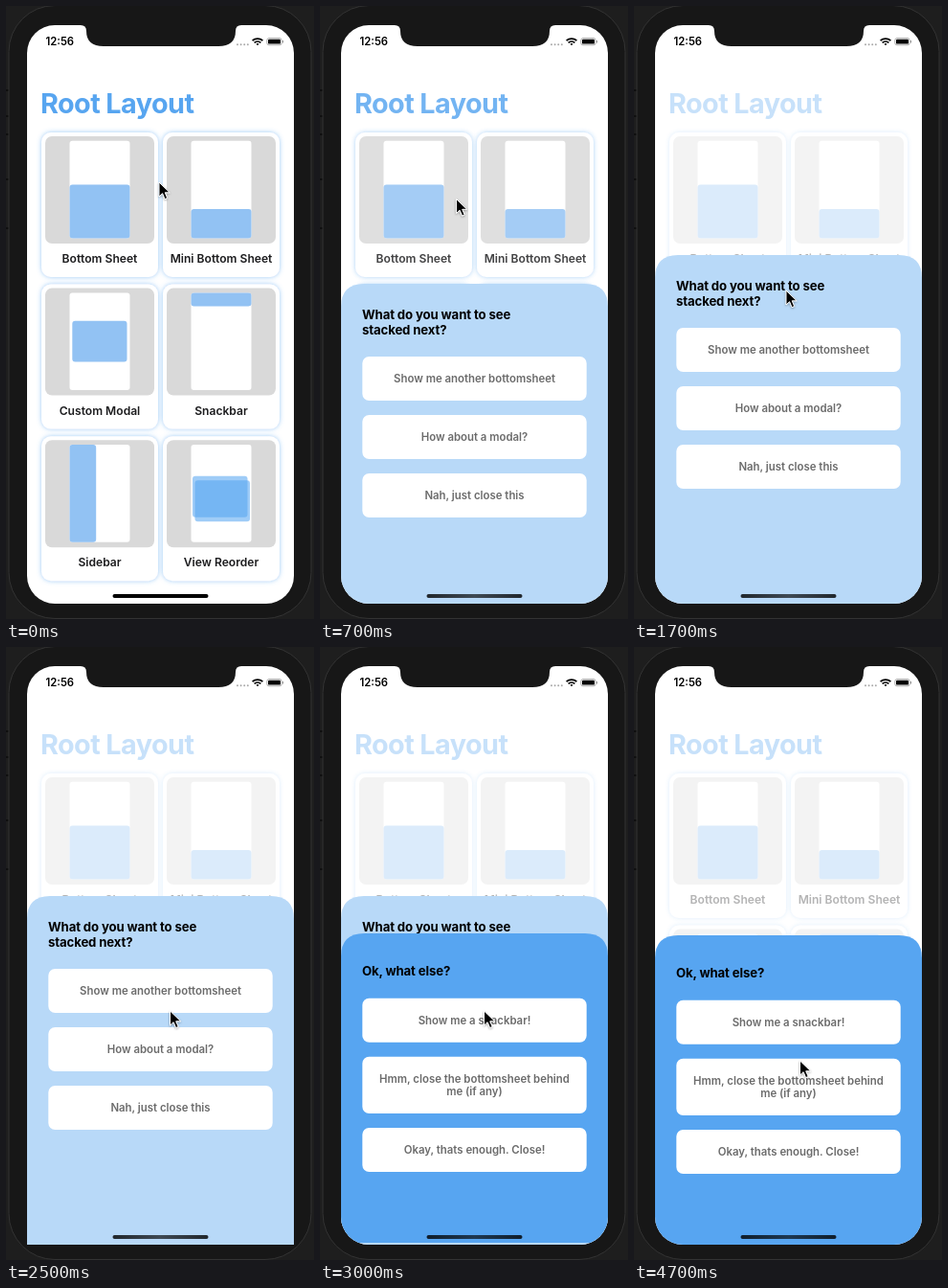
Write an HTML page that moves like this. It is 322x640 px and loops after 5000 ms.

```html
<!DOCTYPE html>
<html lang="en">
<head>
<meta charset="utf-8">
<title>Root layout demo</title>
<style>
  html, body { margin: 0; width: 100%; height: 100%; overflow: hidden; background: #1e1e1e; }
  svg { display: block; width: 322px; height: 640px; }
  text { font-family: Inter, "Open Sans", sans-serif; font-weight: 600; font-optical-sizing: none; }
  .clock { font-size: 11.3px; }
  .heading { font-size: 28.8px; font-weight: 700; letter-spacing: -.02em; fill: #57a5f0; }
  .label { font-size: 12.1px; text-anchor: middle; fill: #1c1c1e; }
  .question { font-size: 13.2px; font-weight: 700; letter-spacing: -.01em; }
  .action { font-size: 11.4px; text-anchor: middle; fill: #6b6b6b; }
</style>
</head>
<body>
<svg viewBox="0 0 322 640">
  <defs>
    <clipPath id="screen"><rect x="22" y="20" width="279" height="604" rx="29"/></clipPath>
    <filter id="glow" x="-15%" y="-15%" width="130%" height="130%">
      <feDropShadow dx="0" dy="0" stdDeviation="2.4" flood-color="#57a5f1" flood-opacity=".6"/>
    </filter>
    <filter id="shade" x="-50%" y="-50%" width="200%" height="200%">
      <feDropShadow dx="0" dy="1" stdDeviation="1" flood-opacity=".35"/>
    </filter>
    <linearGradient id="bar">
      <stop stop-opacity=".82"/><stop offset=".5" stop-opacity=".66"/><stop offset="1" stop-opacity=".82"/>
    </linearGradient>
  </defs>

  <path d="M0 88h3M0 115h3M0 134h3M0 181h3M0 232h3" stroke="#0b0b0b" stroke-width="1.5"/>
  <rect x="3" y="-.5" width="316" height="640" rx="48" fill="#171717" stroke="#333"/>

  <g clip-path="url(#screen)">
    <rect x="22" y="20" width="279" height="604" fill="#fff"/>
    <g id="content">
      <text class="heading" x="36" y="112">Root Layout</text>
      <g id="cards"></g>
    </g>
    <g id="lightSheet"></g>
    <g id="strongSheet"></g>
    <rect id="home" x="111.5" y="614" width="100" height="4" rx="2"/>
  </g>

  <path d="M78 19H246V20q-6 0-6 6q0 16-18 16H102q-18 0-18-16q0-6-6-6z" fill="#171717"/>
  <text class="clock" x="41.5" y="41">12:56</text>
  <path d="M242 40.3h11" stroke="#aaa" stroke-width="2" stroke-linecap="round" stroke-dasharray="0 3.6"/>
  <g fill="none" stroke="#000" stroke-width="1.7">
    <path d="M257.6 36.2a7.8 7.8 0 0 1 10.8 0M259.6 38.4a5 5 0 0 1 6.8 0"/>
    <path d="M261.5 39.6q1.5-1 3 0l-1.5 1.6z" fill="#000" stroke="none"/>
    <rect x="272.8" y="33.6" width="15.4" height="7.2" rx="2.2" stroke="#999" stroke-width=".8"/>
    <rect x="274" y="34.8" width="13" height="4.8" rx="1.2" fill="#000" stroke="none"/>
    <path d="M289.6 36v2.5" stroke="#999" stroke-width="1"/>
  </g>

  <path id="cursor" d="M0 0V15L3.6 11.7L6.1 17.6L8.7 16.5L6.2 10.8H11.2Z" stroke="#fff" stroke-width="1" filter="url(#shade)"/>
</svg>

<script>
const byId = id => document.getElementById(id);
const rect = (x, y, w, h, rx, fill, extra = '') =>
  `<rect x="${x}" y="${y}" width="${w}" height="${h}" rx="${rx}" fill="${fill}" ${extra}/>`;
const text = (kind, x, y, words) => `<text class="${kind}" x="${x}" y="${y}">${words}</text>`;

const ICON_BLUE = '#92c2f3';
const block = (x, y, w, h) => rect(x, y, w, h, 3, ICON_BLUE);
const layer = (x, y) => rect(x, y, 57.5, 43, 3, '#57a5f1', 'fill-opacity=".57"');

const cards = [
  ['Bottom Sheet', block(29.5, 54.5, 63, 56)],
  ['Mini Bottom Sheet', block(29.5, 80, 63, 30.5)],
  ['Custom Modal', block(32.3, 38.2, 57.2, 42.8)],
  ['Snackbar', block(29.5, 8.8, 63, 14)],
  ['Sidebar', block(29.5, 8.8, 27.7, 101.7)],
  ['View Reorder', layer(31, 41.5) + layer(33.5, 46)],
];
byId('cards').innerHTML = cards.map(([name, icon], i) =>
  `<g transform="translate(${37 + i % 2 * 127} ${132 + Math.floor(i / 2) * 158.6})">
    ${rect(0, 0, 122, 151, 10, '#fff', 'filter="url(#glow)"')}
    ${rect(4, 4, 114, 112, 7, '#d9d9d9')}
    ${rect(29.5, 8.8, 63, 101.7, 3, '#fff')}
    ${icon}${text('label', 61, 136.3, name)}
  </g>`).join('');

// Sheets are drawn with their top edge at y = 0.
const button = (y, ...lines) => {
  const height = 32.7 + 13.3 * lines.length;
  const first = y + height / 2 + 4.1 - (lines.length - 1) * 6.65;
  return rect(44.3, y, 234.4, height, 7, '#fff') +
    lines.map((line, i) => text('action', 161.5, first + i * 13.3, line)).join('');
};
const sheet = (height, fill, body) =>
  `<path d="M22 ${height}V24q0-24 24-24H277q24 0 24 24V${height}z" fill="${fill}"/>${body}`;

byId('lightSheet').innerHTML = sheet(364, '#b8d9f8',
  text('question', 44, 37, 'What do you want to see') +
  text('question', 44, 53, 'stacked next?') +
  button(76, 'Show me another bottomsheet') +
  button(137, 'How about a modal?') +
  button(198, 'Nah, just close this'));
byId('strongSheet').innerHTML = sheet(323, '#57a5f1',
  text('question', 44, 44, 'Ok, what else?') +
  button(67.8, 'Show me a snackbar!') +
  button(128.8, 'Hmm, close the bottomsheet behind', 'me (if any)') +
  button(203, 'Okay, thats enough. Close!'));

// Each track lists [time, ...values]; values are interpolated between entries.
const cursorTrack = [[0, 160, 184], [100, 159, 185], [500, 143, 201], [600, 142.5, 201.5],
  [1200, 142.5, 201.5], [1700, 159, 297], [2200, 159, 297], [2300, 166, 350],
  [2400, 171, 400], [2500, 171.5, 380], [4000, 171.5, 380], [4300, 173.5, 432]];
const fadeTrack = [[600, 1], [1000, .33]];
const lightTrack = [[600, 624], [700, 290], [800, 250], [900, 257], [1000, 260],
  [4400, 260], [4500, 278], [4600, 624]];
const strongTrack = [[2600, 624], [2700, 540], [2800, 319], [2900, 290], [3000, 299],
  [3100, 301.5], [3200, 301]];

function sample(track, t) {
  const next = track.findIndex(key => key[0] > t);
  if (next < 0) return track.at(-1).slice(1);
  if (next === 0) return track[0].slice(1);
  const a = track[next - 1], b = track[next];
  const k = (t - a[0]) / (b[0] - a[0]);
  return a.slice(1).map((v, i) => v + (b[i + 1] - v) * k);
}
const move = (id, x, y) => byId(id).setAttribute('transform', `translate(${x} ${y})`);

function draw(now) {
  const t = Math.floor(now % 5000 / 100) * 100;
  byId('content').setAttribute('opacity', sample(fadeTrack, t)[0]);
  move('lightSheet', 0, sample(lightTrack, t)[0]);
  move('strongSheet', 0, sample(strongTrack, t)[0]);
  move('cursor', ...sample(cursorTrack, t));
  byId('home').setAttribute('fill', t < 700 ? '#000' : 'url(#bar)');
  requestAnimationFrame(draw);
}
draw(0);
</script>
</body>
</html>
```
